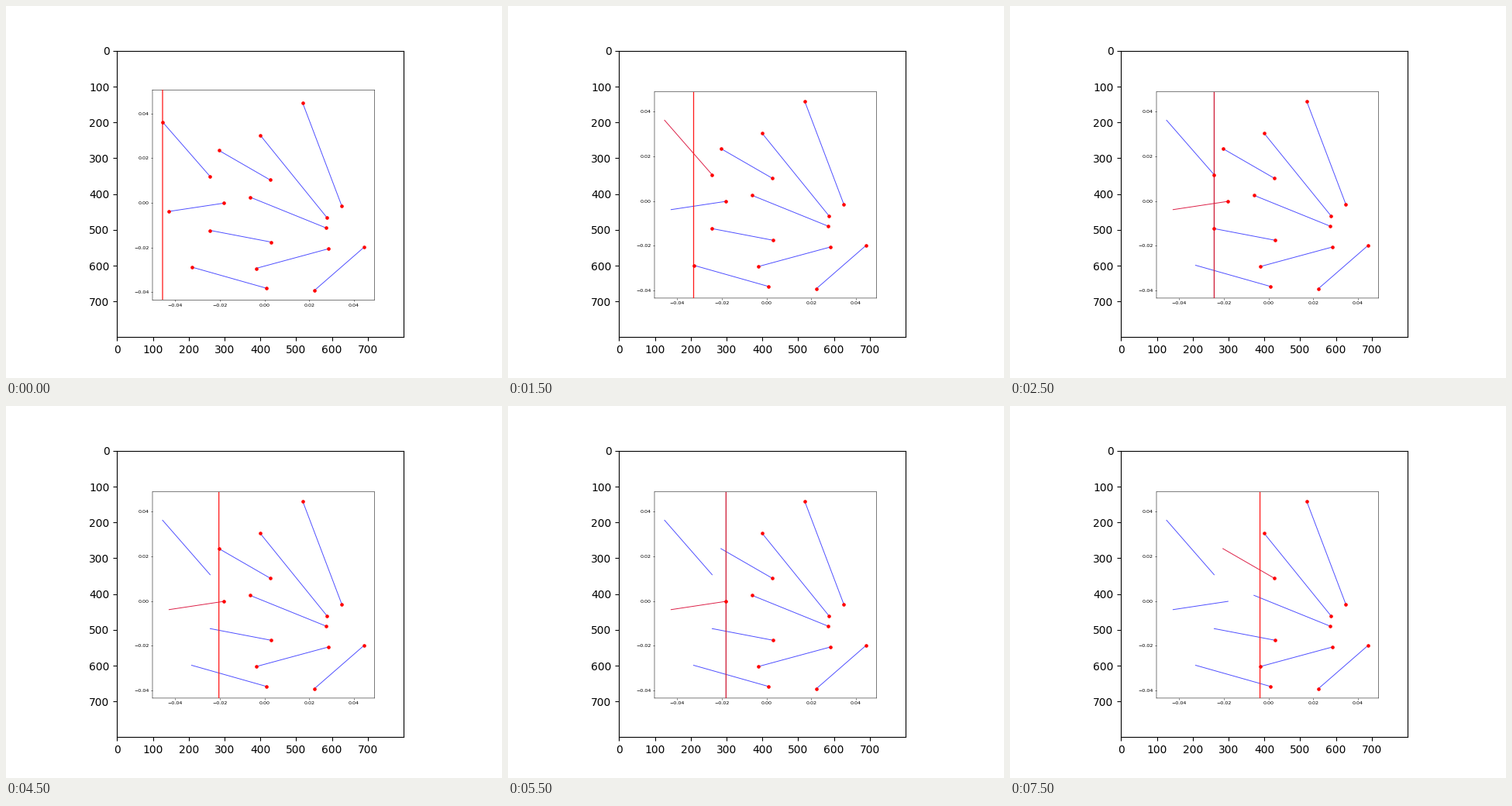
Animation, 640 px wide and 480 px high, one loop 8 s. Source, as a matplotlib script:

```python
import matplotlib.pyplot as plt
from matplotlib.animation import FuncAnimation

W, H, DPI = 640, 480, 100
SIDE = 369.6              # outer square, in pixels
K = SIDE / 800            # the 800-pixel plot is shown at this size
X0, Y0 = 143.2, 57.6      # top left of the outer square
NUDGE = 0.4
BLUE, RED, DARK_RED = "#4d4dff", "#ff1a1a", "#cf1c36"

# segments as left x, y and right x, y, in thousandths
SEGMENTS = [
    (-45.6, 36.2, -24.3, 11.8), (-42.7, -3.8, -18.1, -0.1),
    (-24.3, -12.3, 2.9, -17.5), (-32.6, -28.7, 1.0, -38.2),
    (-20.4, 23.5, 2.5, 10.3), (-6.5, 2.6, 27.6, -11.2),
    (-1.9, 30.3, 27.9, -6.5), (-3.8, -29.3, 28.7, -20.5),
    (17.1, 44.7, 34.6, -1.4), (22.3, -39.2, 44.7, -19.7),
]
SEGMENTS = [tuple(v / 1000 for v in s) for s in SEGMENTS]
EVENTS = sorted((s[j], s[j + 1], i)
                for i, s in enumerate(SEGMENTS) for j in (0, 2))
RIGHT_ENDS = {s[2] for s in SEGMENTS}


def height_at(i, x):
    x0, y0, x1, y1 = SEGMENTS[i]
    return y0 + (y1 - y0) * (x - x0) / (x1 - x0)


def tree_roots():
    """Root of the tree of open segments, before and after each event."""
    roots, status, root = [None], [], None
    for x, _, i in EVENTS:
        if i not in status:
            status.append(i)
            status.sort(key=lambda s: -height_at(s, x))
            if len(status) == 1:
                root = i
            elif len(status) == 3:      # rebalance
                root = status[1]
        else:
            place = status.index(i)
            status.remove(i)
            if i == root:               # the one above takes over
                root = status[max(place - 1, 0)] if status else None
        roots.append(root)
    return roots


ROOTS = tree_roots()


def stage_box(left, top, width, height):
    return [left / W, 1 - (top + height) / H, width / W, height / H]


def padded(low, high):
    pad = 0.05 * (high - low)
    return low - pad, high + pad


fig = plt.figure(figsize=(W / DPI, H / DPI), dpi=DPI, facecolor="white")

outer = fig.add_axes(stage_box(X0, Y0, SIDE, SIDE))
outer.set(xlim=(-0.5, 799.5), ylim=(799.5, -0.5),
          xticks=range(0, 800, 100), yticks=range(0, 800, 100))

ax = fig.add_axes(stage_box(X0 + 100 * K - NUDGE, Y0 + 96 * K - NUDGE,
                            620 * K, 616 * K))
ticks = [0.02 * n for n in range(-2, 3)]
ax.set(xticks=ticks, yticks=ticks, aspect="equal")
ax.xaxis.set_major_formatter("{x:.2f}")
ax.yaxis.set_major_formatter("{x:.2f}")
ax.tick_params(labelsize=10 * K, length=3.5 * K, width=0.8 * K, pad=3.5 * K)
for spine in ax.spines.values():
    spine.set(linewidth=0.8 * K, snap=False)

lines = [ax.plot([x0, x1], [y0, y1], color=BLUE, lw=1.5 * K, zorder=2)[0]
         for x0, y0, x1, y1 in SEGMENTS]
sweep = ax.axvline(0, lw=2 * K, zorder=3, snap=False)
dots, = ax.plot([], [], "o", color="red", ms=6 * K, mew=K, zorder=4)

xs, ys, _ = zip(*EVENTS)
ax.set_xlim(padded(min(xs), max(xs)))


def draw(frame):
    state = (frame + 1) // 2
    # the view settles after the first event
    ax.set_ylim(padded(min(ys), max(ys) if state else 0.0463))

    for i, line in enumerate(lines):
        line.set_color("#dc1e46" if i == ROOTS[state] else BLUE)
    x = xs[state]
    sweep.set_xdata([x, x])
    sweep.set_color(DARK_RED if x in RIGHT_ENDS else RED)
    dots.set_data(xs[state:], ys[state:])
    return [*lines, sweep, dots]


anim = FuncAnimation(fig, draw, frames=16, interval=500, repeat=True,
                     repeat_delay=0, blit=False)
plt.show()
```
